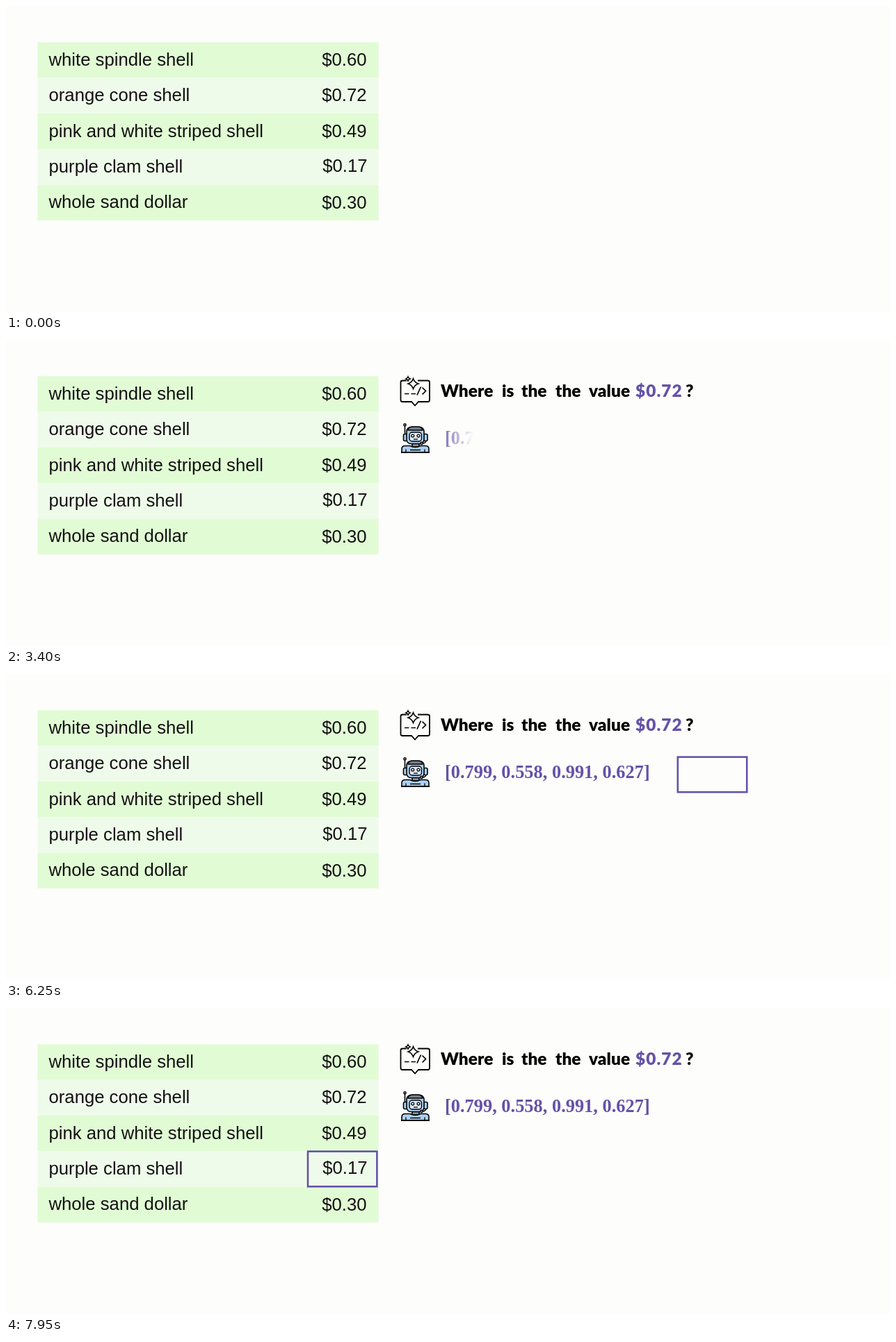
An HTML page with a canvas for the animation above (8 s loop, 1271 px wide and 441 px high).

```html
<!DOCTYPE html>
<html lang="en">
<head>
<meta charset="utf-8">
<title>Locating a value in a table</title>
<style>
  html, body { margin: 0; width: 100%; height: 100%; overflow: hidden; background: #fdfdfb; }
  canvas { display: block; }
</style>
</head>
<body>
<canvas id="stage" width="1271" height="441"></canvas>
<script>
const W = 1271, H = 441, LOOP = 8000, STEP = 50;
const PURPLE = '#6552a8', INK = '#000';
const stage = document.getElementById('stage').getContext('2d');
const layer = Object.assign(document.createElement('canvas'), { width: W, height: H }).getContext('2d');

const rows = [
  ['white spindle shell', '$0.60'],
  ['orange cone shell', '$0.72'],
  ['pink and white striped shell', '$0.49'],
  ['purple clam shell', '$0.17'],
  ['whole sand dollar', '$0.30']
];

const clamp = v => Math.max(0, Math.min(1, v));
const progress = (t, start, duration) => clamp((t - start) / duration);
const ease = p => (1 - Math.cos(Math.PI * p)) / 2;

function text(c, str, x, y, font, color, spacing = 0) {
  c.font = font;
  c.fillStyle = color;
  c.letterSpacing = spacing + 'px';
  c.fillText(str, x, y);
}

function shape(c, d, fill, stroke = INK, width = 1.6) {
  const path = new Path2D(d);
  if (fill) { c.fillStyle = fill; c.fill(path); }
  if (stroke) { c.strokeStyle = stroke; c.lineWidth = width; c.stroke(path); }
}

function box(c, x, y, w, h, r, fill, width = 1.6) {
  c.beginPath();
  c.roundRect(x, y, w, h, r);
  c.fillStyle = fill;
  c.fill();
  c.strokeStyle = INK;
  c.lineWidth = width;
  c.stroke();
}

function dot(c, x, y, r, fill, stroke) {
  c.beginPath();
  c.arc(x, y, r, 0, 7);
  c.fillStyle = fill;
  c.fill();
  if (stroke) { c.strokeStyle = INK; c.lineWidth = 1.3; c.stroke(); }
}

// Four-pointed star with concave sides.
function sparkle(c, x, y, r, width) {
  const k = r * 0.26;
  shape(c, `M${x} ${y - r}Q${x + k} ${y - k} ${x + r} ${y}Q${x + k} ${y + k} ${x} ${y + r}` +
    `Q${x - k} ${y + k} ${x - r} ${y}Q${x - k} ${y - k} ${x} ${y - r}Z`, '#fdfdfb', INK, width);
}

function table(c) {
  const font = '25.7px "Liberation Sans", Arial, sans-serif';
  rows.forEach(([name, price], i) => {
    const y = 52.3 + i * 51.35;
    c.fillStyle = i % 2 ? '#effbea' : '#e1fcd4';
    c.fillRect(45.5, y, 490, 51.35);
    const nudge = i === 3 ? 1 : 0;
    text(c, name, 61.5, y + 33.6, font, '#111');
    text(c, price, 454.3 + nudge, y + 33.8 - nudge, font, '#111');
  });
}

function promptIcon(c) {
  shape(c, 'M576 58.5H570Q567.5 58.5 567.5 61V86.5Q567.5 89 570 89H583L588 94.5L593 89H606.5' +
    'Q609 89 609 86.5V61Q609 58.5 606.5 58.5H592', null, INK, 1.8);
  shape(c, 'M573 77.5H579.5M582.5 77.5H589M591 79.5L596.5 67.5M598.5 68.5L603.5 73.5L598.5 78.5', null, INK, 1.7);
  sparkle(c, 585.5, 63, 7.3, 1.7);
  sparkle(c, 578, 56, 3, 1.5);
}

function robotIcon(c) {
  const blue = '#abd0f2', pale = '#dbe9f8';
  shape(c, 'M573.5 124V142', null);
  dot(c, 573.5, 122.3, 1.7, '#8a8f98', true);
  box(c, 584, 146, 10, 8, 1, '#8a8f98');
  shape(c, 'M569 162V157Q569 152.5 574 152.5H581Q588.5 156.5 596 152.5H603Q608 152.5 608 157V162Z', blue);
  shape(c, 'M575 162V157.5M602 162V157.5M581 158.5H596', null, INK, 1.3);
  box(c, 571.5, 135.5, 5.5, 10, 2, blue);
  box(c, 600.5, 135.5, 5.5, 10, 2, blue);
  box(c, 576, 125.5, 25, 24, 6, blue);
  shape(c, 'M578 130Q579 125 585 125H592Q598 125 599 130Z', '#777e8a', INK, 1.3);
  box(c, 580, 133, 17.5, 13, 4, pale, 1.4);
  dot(c, 584.8, 138, 1.9, '#fff', true);
  dot(c, 593, 138, 1.9, '#fff', true);
  shape(c, 'M586 143H592', null, INK, 1.3);
  shape(c, 'M604 145.5Q603 149 598.5 149', null, INK, 1.4);
  dot(c, 597.5, 149, 1.8, '#e7568c', true);
  shape(c, 'M568 162H609', null, INK, 1.8);
}

function question(c) {
  const font = '900 24.5px Lato, "Open Sans", sans-serif', y = 82;
  [['Where', 625], ['is', 713], ['the', 741], ['the', 790], ['value', 838]]
    .forEach(([word, x]) => text(c, word, x, y, font, INK));
  text(c, '$0.72', 905, y, font, PURPLE, 1);
  text(c, '?', 977, y, font, INK);
}

function answer(c) {
  text(c, '[0.799, 0.558, 0.991, 0.627]', 631, 150,
    'bold 26.4px "Liberation Serif", "Times New Roman", serif', PURPLE);
}

function arrow(c) {
  shape(c, 'M936 141.5H979', null, '#1c1440', 2.4);
  shape(c, 'M977 136.5L985 141.5L977 146.5Z', '#1c1440', null);
}

// Reveals a drawing from left to right behind a soft edge.
function wipe(draw, x, w, p) {
  if (p <= 0) return;
  if (p >= 1) { draw(stage); return; }
  const soft = w / 6, edge = x + p * (w + soft);
  layer.clearRect(0, 0, W, H);
  draw(layer);
  const mask = layer.createLinearGradient(edge - soft, 0, edge, 0);
  mask.addColorStop(0, 'rgba(0,0,0,1)');
  mask.addColorStop(1, 'rgba(0,0,0,0)');
  layer.globalCompositeOperation = 'destination-in';
  layer.fillStyle = mask;
  layer.fillRect(0, 0, W, H);
  layer.globalCompositeOperation = 'source-over';
  stage.drawImage(layer.canvas, 0, 0);
}

function fade(draw, alpha) {
  if (alpha <= 0) return;
  stage.globalAlpha = alpha;
  draw(stage);
  stage.globalAlpha = 1;
}

function render(t) {
  stage.fillStyle = '#fdfdfb';
  stage.fillRect(0, 0, W, H);
  table(stage);

  fade(promptIcon, progress(t, 890, 250));
  wipe(question, 616, 382, progress(t, 1141, 1750));
  fade(robotIcon, progress(t, 2890, 250));
  wipe(answer, 622, 314, progress(t, 3161, 1750));
  if (t < 6000) wipe(arrow, 936, 49, progress(t, 4950, 500));

  const move = ease(progress(t, 6000, 1950));
  fade(c => {
    c.strokeStyle = PURPLE;
    c.lineWidth = 2.6;
    c.strokeRect(988 - 554 * move, 116 + 90.7 * move, 99.4, 50.6);
  }, progress(t, 5450, 500));
}

const origin = performance.now();
function tick() {
  const t = (performance.now() - origin) % LOOP;
  render(Math.floor(t / STEP) * STEP);
  requestAnimationFrame(tick);
}
tick();
</script>
</body>
</html>
```
